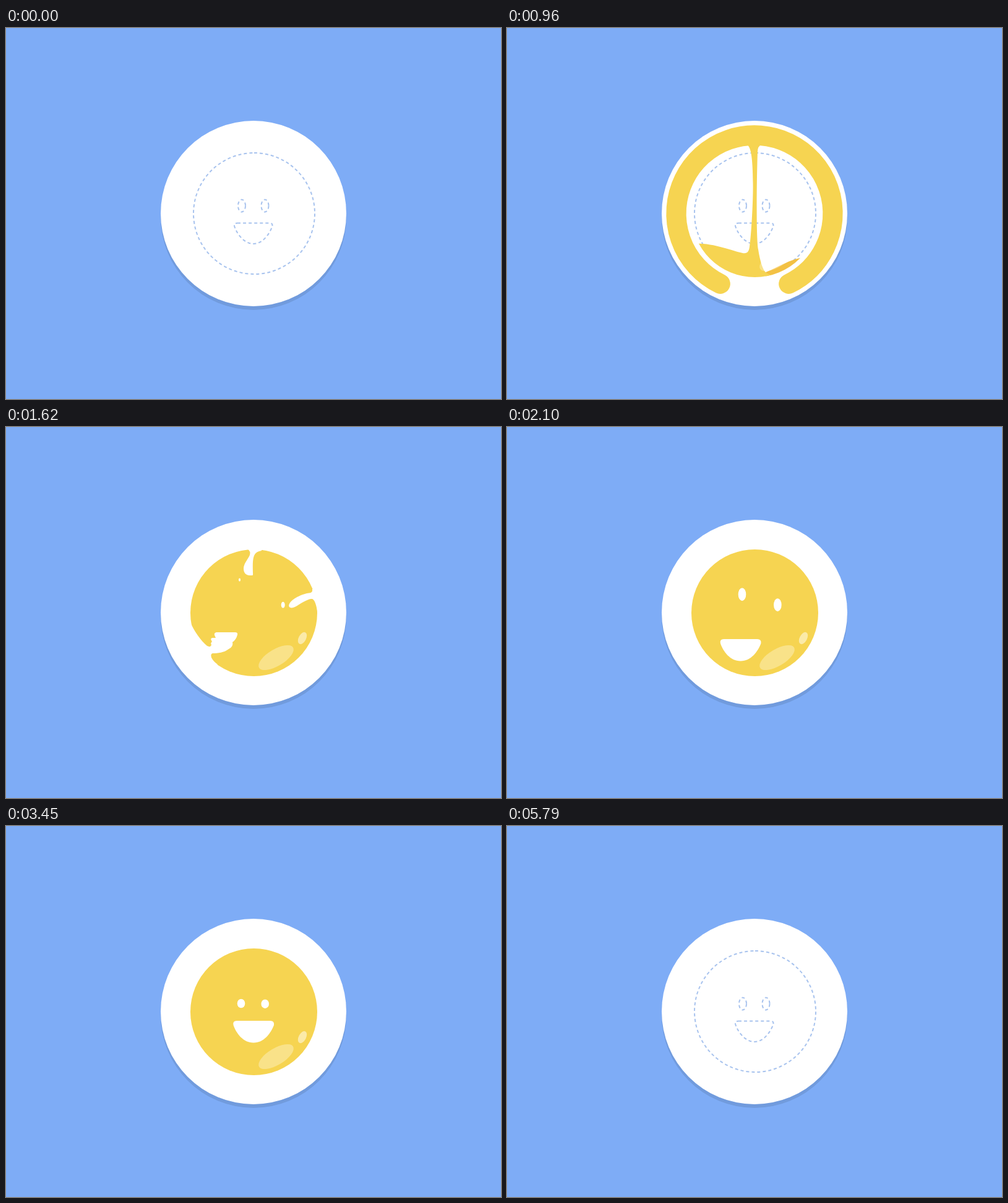
These frames come from a looping animation (800x600 px, 6.27 s). An HTML page with a canvas:

```html
<!DOCTYPE html>
<html lang="en">
<head>
<meta charset="utf-8">
<title>Smiling egg</title>
<style>
html, body { margin: 0; height: 100%; overflow: hidden; background: #7eacf6; }
canvas { display: block; }
</style>
</head>
<body>
<canvas width="800" height="600"></canvas>
<script>
const c = document.querySelector('canvas').getContext('2d');
const LOOP = 6270, STEP = 30, TAU = 2 * Math.PI, TOP = -Math.PI / 2;
const YOLK = '#f6d451', BACK = '#f3c144', SKY = '#7eacf6';
const CX = 400.5, CY = 300.5, YOLK_R = 102.5;

const clamp = x => Math.max(0, Math.min(1, x));
const span = (t, a, b) => clamp((t - a) / (b - a));
const mix = (a, b, u) => a + (b - a) * u;
const inOut = u => u < .5 ? 2 * u * u : 1 - 2 * (1 - u) ** 2;

// Value at time t between [time, value] keys
function keyed(t, keys) {
  return keys.slice(1).reduce((v, [time, value], i) =>
    mix(v, value, inOut(span(t, keys[i][0], time))), keys[0][1]);
}

function ellipse(x, y, rx, ry, color, turn = 0) {
  c.fillStyle = color;
  c.beginPath();
  c.ellipse(x, y, rx, ry, turn, 0, TAU);
  c.fill();
}

const disc = (x, y, r, color) => ellipse(x, y, r, r, color);

function shape(path, color) {
  c.fillStyle = color;
  c.fill(new Path2D(path));
}

// Draws around an anchor point, scaled and shifted
function placed(x, y, sx, sy, dx, dy, draw) {
  c.save();
  c.translate(x + dx, y + dy);
  c.scale(sx, sy);
  c.translate(-x, -y);
  draw();
  c.restore();
}

const mouth = 'M373 315 H427 Q434 315 433 322 C428 335 417 350.5 400 350.5 C383 350.5 372 335 367.5 322 Q366 315 373 315 Z';
const guide = new Path2D('M374 315.5 H426 Q431 315.5 430.5 320 C427 331 416 349 400 349 C384 349 372 331 369 320 Q368.5 315.5 374 315.5 Z');
const gaps = [
  [401, 198, 'M390 197 Q396 201 394 207 C391 214 384 221 384 229 C384 236 388 240 394 240 H398 Q399.5 240 399 236 C399 228 398 215 401 208 Q404 201 413 200 V194 H390 Z'],
  [500, 272, 'M495 262 Q496 268 490 268.5 C478 270 462 278 458 286 C455 292 461 294 467 291 C476 286 488 277 495 278 Q500 280 503 297 H508 V262 Z'],
  [315, 362, 'M299 318 C303 328 315 346 325 354 Q331 357 332 352 Q330 350 333 347 Q329 341 334 341 H339 Q334 333 340 332 H370 Q375 332 374 336 Q372 344 366 348 Q368 355 360 359 C352 365 343 366 334 366 Q330 367 332 373 Q335 379 342 384 L325 390 L290 320 Z']
];

function plate() {
  c.fillStyle = SKY;
  c.fillRect(0, 0, 800, 600);
  disc(400, 306, 150, '#719bdd');
  disc(400, 300, 150, '#fff');
}

function outlines(t) {
  const alpha = t < 1530 ? 1 : span(t, 5400, 5790);
  if (!alpha) return;
  c.save();
  c.globalAlpha = alpha;
  c.strokeStyle = '#a8c3ee';
  c.lineWidth = 2;
  c.setLineDash([5, 4.06]);
  c.beginPath();
  c.arc(401, 300, 98, TOP, TOP + TAU);
  c.stroke();
  for (const x of [381, 418.5]) {
    c.beginPath();
    c.ellipse(x, 287.5, 6, 10, 0, 0, TAU);
    c.stroke();
  }
  c.stroke(guide);
  c.restore();
}

function ring(t) {
  if (t < STEP || t >= 1530) return;
  const drain = span(t, 660, 1450), fall = span(t, 1440, 1530);
  const half = Math.PI * (1 - drain ** 2);
  const start = t < 660 ? TOP : TOP - half;
  const sweep = t < 660 ? TAU * inOut(span(t, 0, 615)) : 2 * half;
  c.strokeStyle = YOLK;
  c.lineCap = 'round';
  c.lineWidth = mix(34 - 4.4 * drain, 8, fall);
  c.beginPath();
  c.arc(400, 300, mix(126.5, 95, fall), start, start + Math.max(sweep, .001));
  c.stroke();
  c.lineCap = 'butt';
}

function pour(t) {
  if (t < 660 || t >= 1530) return;
  const rise = (1200 - t) * .31 - Math.max(0, t - 1380) * .15;
  const rock = 8 * Math.sin((t - 1200) / 90);
  const tip = mix(190, 404, span(t, 660, 860) ** 2);
  const left = y => y + rise + rock;
  const right = y => y + rise - rock;
  const neck = mix(190, Math.max(190, left(283)), .376);

  c.save();
  c.beginPath();
  c.rect(250, 150, 300, tip - 150);
  c.clip();
  c.beginPath();
  c.arc(CX, CY, YOLK_R, 0, TAU);
  c.rect(380, 180, 40, 60);
  c.clip();

  shape(`M418 ${right(317)} C440 ${right(308)} 462 ${right(293)} 484 ${right(293)}
    C495 ${right(293)} 500 ${right(299)} 503 ${right(308)} V${right(330)} H418 Z`, BACK);
  shape(`M290 ${left(279)} C325 ${left(273)} 362 ${left(289)} 380 ${left(293)}
    C388 ${left(295)} 391 ${left(291)} 392 ${left(283)}
    C395 ${left(262)} 398 ${neck + 25} 397.5 ${neck}
    C397 205 394 190 386 188 H412 Q405 191 405 200
    C403 ${neck + 10} 403 ${right(265)} 406 ${right(280)}
    C409 ${right(300)} 414 ${right(314)} 418 ${right(317)}
    C432 ${right(328)} 460 ${right(325)} 510 ${right(327)}
    V450 H290 Z`, YOLK);
  c.restore();
  if (t < 860) disc(401, tip, 5 * clamp((404 - tip) / 20), YOLK);
}

function face(t) {
  const gap = Math.min(1.6, (1740 - t) / 120);
  if (gap > 0) {
    for (const [x, y, path] of gaps) {
      placed(x, y, gap, gap, 0, 0, () => shape(path, '#fff'));
    }
  }
  if (t < 1590) return;

  const grow = span(t, 1620, 1860), enter = span(t, 1620, 1890);
  const away = 1 - inOut(span(t, 1890, 2520));
  const blink = 1 - .9 * Math.max(
    Math.sin(Math.PI * span(t, 2940, 3210)),
    Math.sin(Math.PI * span(t, 3210, 3480)));
  const eyeL = mix(.25, 1, grow), eyeR = mix(.48, 1, grow);
  ellipse(mix(377.5, 380, enter), 287 - mix(40, 21, enter) * away, 6.3 * eyeL, 10.5 * eyeL * blink, '#fff');
  ellipse(418.7 + mix(29, 24, enter) * away, 287.7, 6.3 * eyeR, 10.5 * eyeR * blink, '#fff');

  const size = mix(.35, 1, grow);
  const open = keyed(t, [[2520, 1], [2640, .43], [2730, 1.2], [2790, 1]]);
  placed(400, 332.6, size, size * open, -mix(48, 29, enter) * away, mix(18, 36, enter) * away,
    () => shape(mouth, '#fff'));
}

function shine() {
  ellipse(436.5, 373, 32, 13.5, 'rgba(255,255,255,.32)', -.54);
  ellipse(479, 341.5, 6, 10.5, 'rgba(255,255,255,.5)', .48);
}

function frame(now) {
  const t = Math.floor(now % LOOP / STEP) * STEP;
  plate();
  outlines(t);
  ring(t);
  pour(t);
  if (t >= 1530 && t < 5010) {
    disc(CX, CY, YOLK_R * (1 - span(t, 4740, 5010) ** 2), YOLK);
    face(t);
  }
  shine();
  requestAnimationFrame(frame);
}
requestAnimationFrame(frame);
</script>
</body>
</html>
```
